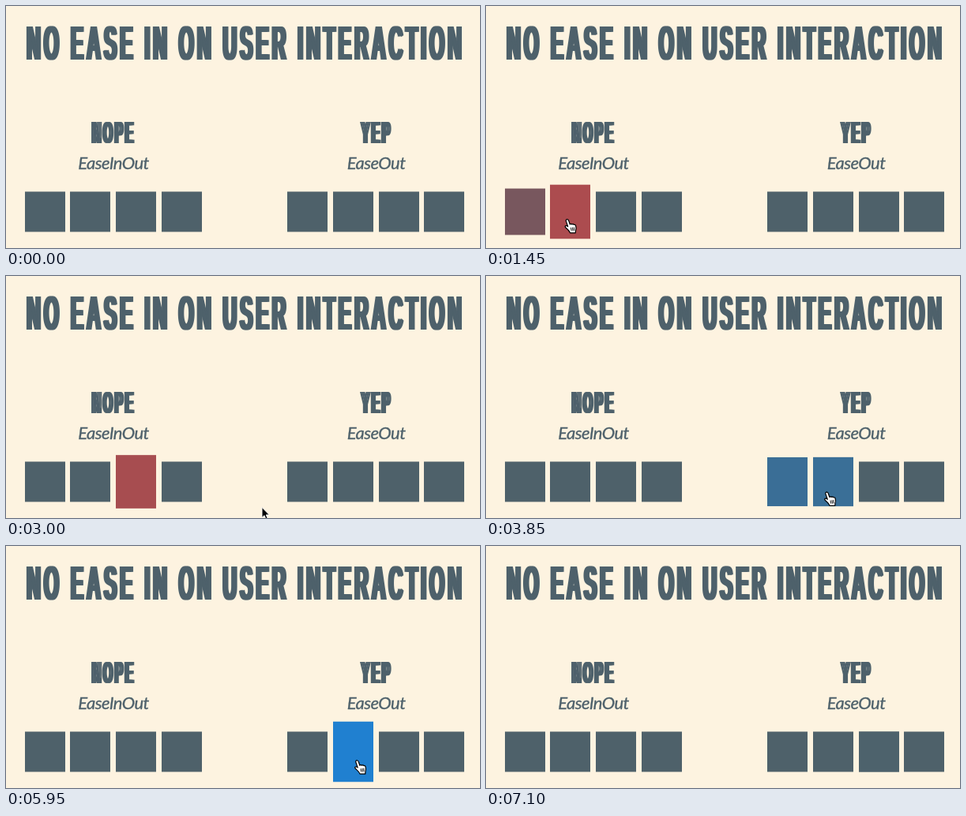
An HTML page for the animation above (7150 ms loop, 600x307 px).

```html
<!DOCTYPE html>
<html lang="en">
<head>
<meta charset="utf-8">
<title>No ease in on user interaction</title>
<style>
  html, body { margin: 0; width: 100%; height: 100%; overflow: hidden; background: #fdf3e0; }
  svg { display: block; width: 600px; height: 307px; }
  text { fill: #4e616b; }
  /* Condensed poster lettering: the shadows widen the upright stems. */
  .poster {
    font: bold 61px "Liberation Sans", Arial, sans-serif;
    letter-spacing: .167em;
    text-shadow: .062em 0 #4e616b, -.062em 0 #4e616b;
  }
  .label {
    font: italic 22px Lato, sans-serif; letter-spacing: -.55px; text-anchor: middle;
    stroke: #4e616b; stroke-width: .35px;
  }
</style>
</head>
<body>
<svg viewBox="0 0 600 307">
  <text class="poster" transform="translate(26.3 68.3) scale(.4 1)">NO EASE IN ON USER INTERACTION</text>
  <text class="poster" transform="translate(109 173.7) scale(.256 .64)">NOPE</text>
  <text class="poster" transform="translate(449.8 173.7) scale(.256 .64)">YEP</text>
  <text class="label" x="136" y="206.9">EaseInOut</text>
  <text class="label" x="468.6" y="206.9">EaseOut</text>
  <g id="squares"></g>
  <g id="cursor">
    <g id="hand" stroke="#000" stroke-width="1.2" stroke-linejoin="round" stroke-linecap="round">
      <path fill="#fff" d="M-1.9 1.4Q-1.6-.5 0-.3Q1.4 0 1.9 2L3.2 6Q4.6 4.8 5.8 6Q7.2 5 8.2 6.4Q10 5.8 10.6 8Q11.4 11 10.4 13.8L10.2 16.8H3.4Q2 13.8-.4 11.8Q-3.4 9.4-2.8 8.2Q-1.8 7 .6 8.8Z"/>
      <path fill="none" stroke-width=".9" d="M4.4 10.5L5 13.8M6.4 10.2L6.8 13.8M8.3 10L8.5 13.6"/>
    </g>
    <path id="arrow" stroke="#fff" stroke-width=".9" d="M0 0V13L3 10.3L5 15L7.2 14L5.2 9.5H9.3Z"/>
  </g>
</svg>
<script>
const LOOP = 7150, DURATION = 500;
const SIZE = 51, PITCH = 57.7, MIDDLE = 261;
const SLATE = [78, 97, 106];
const byId = id => document.getElementById(id);
const mix = (a, b, u) => a + (b - a) * u;

const easeOut = u => 1 - (1 - u) ** 3;
const easeInOut = u => u < .5 ? 4 * u ** 3 : 1 - 4 * (1 - u) ** 3;

const rows = [
  { x: 23.7, ease: easeInOut, color: [214, 66, 67] },
  { x: 356.3, ease: easeOut, color: [32, 128, 208] }
];

// Key points of the cursor: time, x, y.
const path = [
  [0, 30, 330], [350, 30, 312], [520, 33, 276], [1450, 103, 271], [2650, 182, 277],
  [2790, 190, 301], [3000, 324, 293.5], [3500, 338, 286], [3762, 414.2, 276],
  [3850, 431.5, 274.5], [4500, 503.5, 275.5], [5050, 503.5, 275.5], [5500, 444.5, 272.3],
  [5950, 444.5, 272.3], [6680, 499, 268], [6750, 500, 310], [LOOP, 500, 330]
];

function cursorAt(time) {
  const next = path.findIndex(point => point[0] > time);
  const [t0, x0, y0] = path[next - 1], [t1, x1, y1] = path[next];
  const u = (time - t0) / (t1 - t0);
  return [mix(x0, x1, u), mix(y0, y1, u)];
}

function makeSquare(row, index) {
  const rect = document.createElementNS("http://www.w3.org/2000/svg", "rect");
  rect.setAttribute("x", Math.round(row.x + index * PITCH));
  rect.setAttribute("width", SIZE);
  byId("squares").append(rect);
  return { row, index, rect, toggles: [] };
}

const squares = rows.flatMap(row => [0, 1, 2, 3].map(index => makeSquare(row, index)));

// Toggles are the times at which the cursor enters and leaves, in turn.
const isHovered = (square, time) => square.toggles.filter(t => t <= time).length % 2 === 1;

// Each toggle starts a new transition from the value reached so far.
function level({ row, toggles }, time) {
  let from = 0, to = 0, start = 0;
  const valueAt = t => mix(from, to, row.ease(Math.min(1, (t - start) / DURATION)));
  for (const toggle of toggles) {
    if (toggle > time) break;
    from = valueAt(toggle);
    to = 1 - to;
    start = toggle;
  }
  return valueAt(time);
}

const heightAt = (square, time) => SIZE * (1 + level(square, time) / 2);

function isUnderCursor(square, time) {
  const [x, y] = cursorAt(time);
  return Math.floor((x - square.row.x) / PITCH) === square.index
    && Math.abs(y - MIDDLE) < heightAt(square, time) / 2;
}

// Follow the cursor once through the loop to find every enter and leave.
for (let time = 0; time < LOOP; time++) {
  for (const square of squares) {
    if (isUnderCursor(square, time) !== isHovered(square, time)) square.toggles.push(time);
  }
}

function draw(time) {
  for (const square of squares) {
    const { rect, row } = square;
    const height = heightAt(square, time);
    const color = SLATE.map((c, i) => Math.round(mix(c, row.color[i], level(square, time))));
    rect.setAttribute("y", MIDDLE - height / 2);
    rect.setAttribute("height", height);
    rect.setAttribute("fill", `rgb(${color})`);
  }
  const hovering = squares.some(square => isHovered(square, time));
  byId("hand").style.display = hovering ? "" : "none";
  byId("arrow").style.display = hovering ? "none" : "";
  byId("cursor").setAttribute("transform", `translate(${cursorAt(time)})`);
}

const began = performance.now();
function tick() {
  draw((performance.now() - began) % LOOP);
  requestAnimationFrame(tick);
}
tick();
</script>
</body>
</html>
```
